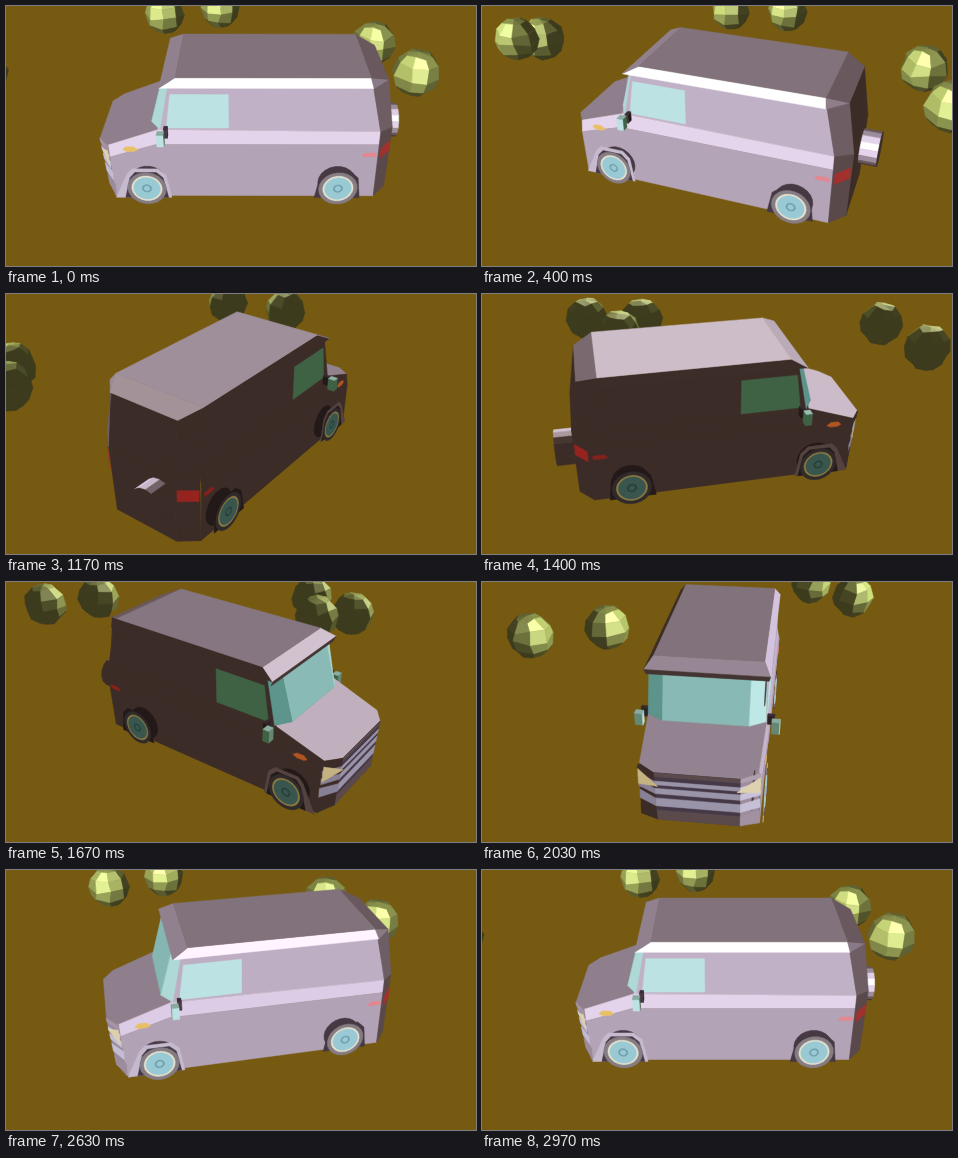
These frames come from a looping animation (470 px wide and 260 px high, 3010 ms). An HTML page with a canvas:

```html
<!DOCTYPE html>
<html lang="en">
<head>
<meta charset="utf-8">
<title>Van turntable</title>
<style>
html, body { margin: 0; width: 100%; height: 100%; overflow: hidden; background: #765a12; }
canvas { display: block; width: 470px; height: 260px; }
</style>
</head>
<body>
<canvas id="stage" width="470" height="260"></canvas>
<script>
const ctx = document.getElementById('stage').getContext('2d');
const LOOP = 3010, STEPS = 90, DIST = 653, TILT = 31.8 * Math.PI / 180;
const SE = Math.sin(TILT), CE = Math.cos(TILT);
ctx.lineJoin = 'round';

// vectors
const sub = (a, b) => a.map((v, i) => v - b[i]);
const dot = (a, b) => a[0] * b[0] + a[1] * b[1] + a[2] * b[2];
const unit = a => { const l = Math.hypot(...a) || 1; return a.map(v => v / l); };
const mean = ps => [0, 1, 2].map(i => ps.reduce((s, p) => s + p[i], 0) / ps.length);
// Newell normal, works for slightly bent polygons
function normal(ps) {
  const n = [0, 0, 0];
  ps.forEach((p, i) => {
    const q = ps[(i + 1) % ps.length];
    n[0] += (p[1] - q[1]) * (p[2] + q[2]);
    n[1] += (p[2] - q[2]) * (p[0] + q[0]);
    n[2] += (p[0] - q[0]) * (p[1] + q[1]);
  });
  return unit(n);
}

// materials: colour in the light, colour in the shade, gloss
const mat = (lit, dark, gloss = 85) => ({ lit, dark, gloss });
const PAINT = mat([174, 158, 178], [60, 44, 40]);
const TRIM = mat([190, 178, 198], [84, 66, 62], 40);
const CHROME = mat([205, 199, 222], [136, 129, 150], 50);
const GAP = mat([92, 78, 98], [62, 50, 62], 10);
const GLASS = mat([182, 220, 220], [64, 98, 68], 20);
const SCREEN = mat([176, 218, 216], [92, 148, 140], 50);
const LAMP = mat([228, 218, 186], [196, 178, 128], 20);
const RED = mat([205, 92, 96], [150, 36, 30], 20);
const PINK = mat([222, 130, 138], [130, 34, 28], 20);
const AMBER = mat([228, 186, 100], [176, 84, 34], 20);
const TYRE = mat([128, 120, 126], [48, 42, 42], 20);
const RING = mat([226, 220, 200], [140, 122, 66], 20);
const HUB = mat([148, 196, 206], [56, 86, 78], 20);
const CAP = mat([108, 152, 164], [40, 62, 56], 20);
const SHADE = mat([70, 56, 66], [34, 25, 24], 0);
const LEAF = mat([160, 171, 92], [60, 59, 30], 72);

const LIGHT = unit([-.3, -.75, .5]);
let eye, view, half, cosA, sinA;

function aim(a) {
  cosA = Math.cos(a); sinA = Math.sin(a);
  view = [sinA * CE, -cosA * CE, SE];
  eye = view.map(v => v * DIST);
  half = unit(view.map((v, i) => v + LIGHT[i]));
}

const depth = p => -sinA * p[0] + cosA * p[1];

function project(p) {
  const h = depth(p), s = DIST / (DIST + h * CE - p[2] * SE);
  return [235 + s * (cosA * p[0] + sinA * p[1]), 130 - s * (h * SE + p[2] * CE)];
}

function shade(m, n) {
  const t = Math.pow(Math.max(0, dot(n, LIGHT)) / .77, 1.3);
  const g = m.gloss * Math.pow(Math.max(0, dot(n, half)), 12);
  const c = m.lit.map((v, i) => Math.min(255, Math.round(m.dark[i] + (v - m.dark[i]) * t + g)));
  return `rgb(${c})`;
}

function face(pts, m, mid) {
  const c = mean(pts);
  let n = normal(pts);
  if (dot(n, sub(c, mid)) < 0) n = n.map(v => -v);
  return { pts, m, n, c };
}

function draw(f) {
  if (dot(f.n, sub(eye, f.c)) <= 0) return;
  ctx.fillStyle = ctx.strokeStyle = shade(f.m, f.n);
  ctx.lineWidth = .5;
  ctx.beginPath();
  f.pts.forEach(p => ctx.lineTo(...project(p)));
  ctx.closePath();
  ctx.fill();
  ctx.stroke();
}

const CORE = [0, 0, 20];
const body = [], details = [], roof = [], spare = [], mirrors = { '-1': [], '1': [] };
const add = (list, m, ...pts) => list.push(face(pts, m, CORE));
const mirrorY = pts => [...pts, ...pts.map(([x, y, z]) => [x, -y, z]).reverse()];

// faces symmetric across the long axis
const across = (list, m, ...pts) => add(list, m, ...mirrorY(pts));
across(body, PAINT, [131, 37, 82], [140, 37, 33]);
across(body, PAINT, [140, 37, 33], [140, 36, -35]);
across(body, PAINT, [-82, 38, 39], [-73, 52, 39], [-122, 50, 21], [-132, 36, 20]);
across(body, GAP, [-132, 36, 20], [-128, 36, -33]);
across(body, SCREEN, [-70, 38, 82], [-82, 38, 39]);

// front strips, wrapping round the chamfered corners
const frontX = z => -132.3 + (20 - z) * .075;
function strip(m, hi, lo) {
  across(details, m, [frontX(hi), 36, hi], [frontX(lo), 36, lo]);
  for (const s of [-1, 1])
    add(details, m, [frontX(hi), 36 * s, hi], [frontX(hi) + 10, 51.5 * s, hi],
      [frontX(lo) + 9, 52 * s, lo], [frontX(lo), 36 * s, lo]);
}
strip(PAINT, 20, 16);
strip(CHROME, 11, 7);
strip(CHROME, 3, -3);
strip(CHROME, -8, -17);
strip(PAINT, -22, -33);

function disc(list, m, x, y, z, r, mid = CORE) {
  const pts = [...Array(22)].map((_, i) => {
    const a = i * Math.PI / 11;
    return [x + r * Math.cos(a), y, z + r * Math.sin(a)];
  });
  list.push(face(pts, m, mid));
}

for (const s of [-1, 1]) {
  const at = (y, pts) => pts.map(([x, z]) => [x, y * s, z]);
  const side = (list, m, ...pts) => add(list, m, ...pts.map(([x, y, z]) => [x, y * s, z]));
  side(body, PAINT, [-66, 51, 82], [115, 51, 82], [126, 52.5, 37], [-75, 52.5, 39]);
  side(body, PAINT, [-75, 52.5, 39], [126, 52.5, 37], [127, 55, 25], [-77, 55, 25], [-122, 52, 9], [-122, 50, 21]);
  side(body, PAINT, [127, 55, 25], [-77, 55, 25], [-122, 52, 9], [-120, 52, -35], [127, 52, -35]);
  side(body, PAINT, [115, 51, 82], [131, 37, 82], [140, 37, 33], [126, 53, 37]);
  side(body, PAINT, [126, 53, 37], [140, 37, 33], [140, 36, -35], [127, 52, -35]);
  side(body, PAINT, [-122, 50, 21], [-132, 36, 20], [-128, 36, -33], [-120, 52, -35]);
  side(body, SCREEN, [-70, 38, 82], [-64, 51, 82], [-73, 52, 39], [-82, 38, 39]);

  side(details, LAMP, [-122.8, 51.5, 16], [-122.3, 52, 0], [-132, 33, 6]);
  side(details, RED, [128, 53.5, 20], [139, 39, 20], [139.5, 39, 9], [128.5, 53, 9]);
  add(details, GLASS, ...at(52.6, [[-62, 75], [-11, 75], [-11, 41], [-67, 41]]));
  add(details, PINK, ...at(55.2, [[111, 13], [114, 16], [124, 16], [124, 12], [113, 12]]));
  add(details, AMBER, ...at(54.5, [[-108, 19], [-105, 22], [-98, 22], [-94, 19], [-98, 17], [-105, 17]]));

  // wheel arches
  add(details, TRIM, ...at(55, [[-119, -35], [-106, -7], [-101, -2], [-77, -2], [-70, -9], [-66, -35]]));
  add(details, SHADE, ...at(55.2, [[-110, -35], [-104, -12], [-99, -6], [-79, -6], [-73, -12], [-69, -35]]));
  add(details, SHADE, ...at(55.2, [[113, -35], [110, -12], [103, -5], [82, -5], [74, -12], [70, -35]]));
  for (const x of [-89, 92]) {
    disc(body, SHADE, x, 44 * s, -24.5, 18);
    [[TYRE, 18.3], [RING, 14.4], [HUB, 12.6], [CAP, 4.4], [HUB, 2.8]]
      .forEach(([m, r]) => disc(details, m, x, 55 * s, -24.5, r));
  }

  // door mirror: a small box on a dark arm
  const box = (m, [x, X], [y, Y], [z, Z]) => {
    const c = [(x + X) / 2, s * (y + Y) / 2, (z + Z) / 2];
    const put = pts => mirrors[s].push(face(pts.map(([a, b, d]) => [a, b * s, d]), m, c));
    for (const a of [x, X]) put([[a, y, z], [a, Y, z], [a, Y, Z], [a, y, Z]]);
    for (const b of [y, Y]) put([[x, b, z], [X, b, z], [X, b, Z], [x, b, Z]]);
    put([[x, y, Z], [X, y, Z], [X, Y, Z], [x, Y, Z]]);
  };
  box(SHADE, [-69, -66], [53, 59], [34, 43]);
  box(GLASS, [-75, -69], [57, 64], [28, 40]);

  // roof edges along the sides and rear corners
  side(roof, PAINT, [-57, 48, 89], [113, 48, 89], [115, 54, 82], [-71, 54, 82]);
  side(roof, PAINT, [113, 48, 89], [131, 37, 82], [115, 54, 82]);
}
across(roof, PAINT, [-57, 48, 89], [-71, 54, 82]);
across(roof, PAINT, [-71, 54, 82], [-69, 53, 77]);
across(roof, PAINT, [113, 48, 89], [131, 37, 82]);
across(roof, PAINT, [-57, 48, 89], [113, 48, 89]);

// spare wheel cover: a short drum on the back
const rim = (x, i, n = 16) => {
  const a = i * 2 * Math.PI / n;
  return [x, 21 + 17 * Math.cos(a), 7 + 17 * Math.sin(a)];
};
for (let i = 0; i < 16; i++)
  spare.push(face([rim(140, i), rim(140, i + 1), rim(157, i + 1), rim(157, i)], PAINT, [148, 21, 7]));
spare.push(face([...Array(16)].map((_, i) => rim(157, i)), PAINT, [148, 21, 7]));

// bushes: rough low-poly balls
let seed = 7;
const rand = () => (seed = seed * 16807 % 2147483647) / 2147483647;
const spots = [[-115, 370], [-33, 393], [179, 264], [216, 173], [-308, -150], [-321, 178], [-354, 164],
  [-283, -235], [75, -280], [40, -318], [115, -336], [410, -93], [366, -154]];

function bush([x, y]) {
  const mid = [x, y, -15], rows = 6, cols = 8, turn = rand() * 6, faces = [];
  const grid = [...Array(rows + 1)].map((_, j) => [...Array(cols)].map((_, i) => {
    const pole = j % rows === 0, wob = pole ? 0 : .22;
    const a = turn + i * 2 * Math.PI / cols + (rand() - .5) * wob;
    const b = j * Math.PI / rows + (rand() - .5) * wob;
    const r = pole ? 28 : 28.3 + rand() * 1.8;
    return [x + r * Math.sin(b) * Math.cos(a), y + r * Math.sin(b) * Math.sin(a), -15 + r * Math.cos(b)];
  }));
  for (let j = 0; j < rows; j++)
    for (let i = 0; i < cols; i++) {
      const k = (i + 1) % cols;
      faces.push(face([grid[j][i], grid[j][k], grid[j + 1][k], grid[j + 1][i]], LEAF, mid));
    }
  return { mid, faces };
}
const bushes = spots.map(bush);

function van() {
  const near = eye[1] > 0 ? 1 : -1, fromBack = eye[0] > 140;
  mirrors[-near].forEach(draw);
  if (!fromBack) spare.forEach(draw);
  body.forEach(draw);
  details.forEach(draw);
  if (fromBack) spare.forEach(draw);
  roof.forEach(draw);
  mirrors[near].forEach(draw);
}

function render(ms) {
  const step = Math.min(STEPS - 1, Math.floor((ms + 5) * 3 / 100));
  const u = (step + 1) / STEPS;
  aim(2 * Math.PI * u * u * (3 - 2 * u));
  ctx.fillStyle = '#765a12';
  ctx.fillRect(0, 0, 470, 260);
  const order = bushes
    .filter(b => Math.abs(project(b.mid)[0] - 235) < 290)
    .sort((a, b) => depth(b.mid) - depth(a.mid));
  order.filter(b => depth(b.mid) > 0).forEach(b => b.faces.forEach(draw));
  van();
  order.filter(b => depth(b.mid) <= 0).forEach(b => b.faces.forEach(draw));
}

const start = performance.now();
function tick() {
  render((performance.now() - start) % LOOP);
  requestAnimationFrame(tick);
}
tick();
</script>
</body>
</html>
```
